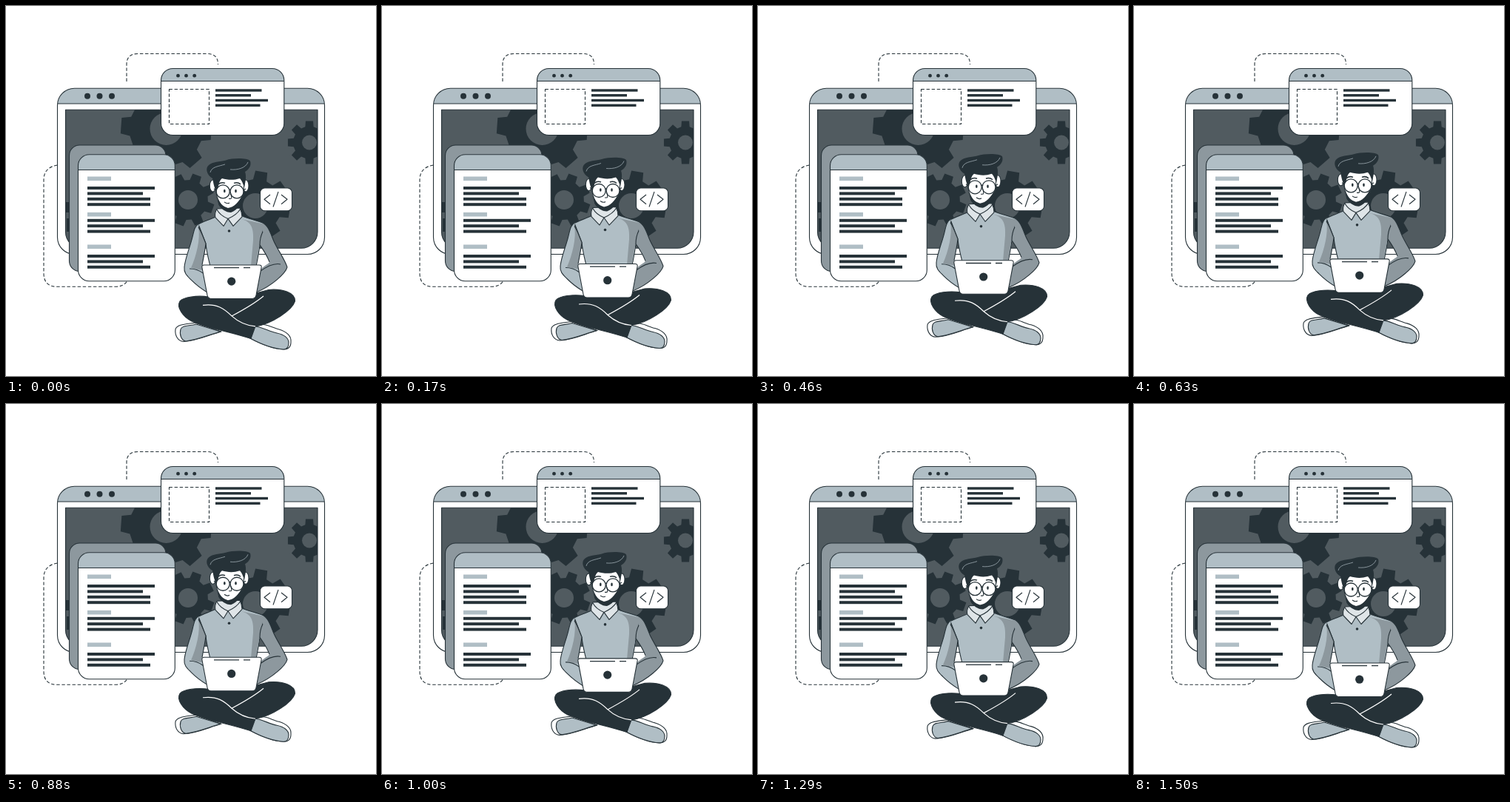
These frames come from a looping animation (500 by 500 pixels, 1540 ms). An HTML page with a canvas:

```html
<!DOCTYPE html>
<html lang="en">
<head>
<meta charset="utf-8">
<title>Developer at work</title>
<style>
html, body { margin: 0; width: 100%; height: 100%; overflow: hidden; background: #fff; }
canvas { display: block; width: 500px; height: 500px; }
</style>
</head>
<body>
<canvas id="stage"></canvas>
<script>
const LOOP = 1540, STEP = 1000 / 24, RISE = 8.5, LOW_POINT = -45;
const INK = '#263238', BLUE = '#b0bec5', SHADE = '#8d989e', SCREEN = '#515b60', WHITE = '#fff', COLLAR = '#dfe5e8';

const canvas = document.getElementById('stage');
const ctx = canvas.getContext('2d');
const ratio = window.devicePixelRatio || 1;
canvas.width = canvas.height = 500 * ratio;

function paint(path, fill, stroke, width = 1.1) {
  if (fill) { ctx.fillStyle = fill; ctx.fill(path); }
  if (stroke) { ctx.strokeStyle = stroke; ctx.lineWidth = width; ctx.stroke(path); }
}

function shape(d, fill, stroke, width) {
  paint(new Path2D(d), fill, stroke, width);
}

function line(d, width = 1.1, color = INK) {
  shape(d, null, color, width);
}

function oval(x, y, rx, ry, fill, stroke, width) {
  const p = new Path2D();
  p.ellipse(x, y, rx, ry, 0, 0, Math.PI * 2);
  paint(p, fill, stroke, width);
}

function dot(x, y, r, fill = INK) {
  oval(x, y, r, r, fill);
}

function box(x, y, right, bottom, radius, fill, stroke) {
  const p = new Path2D();
  p.roundRect(x, y, right - x, bottom - y, radius);
  paint(p, fill, stroke);
  return p;
}

function bar(x, y, right, height, fill = INK) {
  ctx.fillStyle = fill;
  ctx.fillRect(x, y - height / 2, right - x, height);
}

function dashed(d) {
  ctx.setLineDash([4.4, 2.7]);
  line(d);
  ctx.setLineDash([]);
}

function panel(x, y, right, bottom, radius, headerEnd) {
  const frame = box(x, y, right, bottom, radius, WHITE);
  ctx.save();
  ctx.clip(frame);
  ctx.fillStyle = BLUE;
  ctx.fillRect(x, y, right - x, headerEnd - y);
  ctx.restore();
  line(`M${x},${headerEnd}H${right}`);
  paint(frame, null, INK);
}

function gear(x, y, outer, inner, hole, degrees) {
  const p = new Path2D();
  const pitch = Math.PI / 4;
  const corners = [[-0.33, inner], [-0.22, outer], [0.22, outer], [0.33, inner]];
  for (let i = 0; i < 8; i++) {
    const mid = degrees * Math.PI / 180 + i * pitch;
    for (const [part, r] of corners) {
      const a = mid + part * pitch;
      p.lineTo(x + r * Math.cos(a), y + r * Math.sin(a));
    }
  }
  p.closePath();
  paint(p, INK);
  dot(x, y, hole, SCREEN);
}

function monitor() {
  panel(69.5, 111.2, 430.5, 335.5, 23, 132);
  [110, 126.5, 143].forEach(x => dot(x, 121.8, 4));
  const screen = box(80.5, 140.2, 421, 327.3, [0, 0, 22, 22], SCREEN);
  ctx.save();
  ctx.clip(screen);
  gear(216.5, 166, 62, 50, 22, 4);
  gear(246, 262, 36, 27, 13, -70);
  gear(337, 270, 47.5, 36, 17, 10);
  gear(410, 184.5, 29.5, 22, 10, 0);
  bar(80, 272, 86, 14);
  bar(82, 296, 86, 18);
  ctx.restore();
  paint(screen, null, INK);
}

function topWindow() {
  panel(209.5, 84.5, 375.8, 174.5, 16, 101.5);
  [232.5, 243.5, 254.7].forEach(x => dot(x, 94.2, 2.4));
  dashed('M220.5,112.5H274.5V159.5H220.5Z');
  [345.5, 331, 354, 343.5].forEach((right, i) => bar(283, 114 + i * 6.75, right, 3.4));
}

function documents() {
  box(85.5, 188, 216, 358.5, 14, SHADE, INK);
  panel(97.5, 200.7, 228.3, 371.7, 15, 221.5);
  const sections = [[233.3, 246, 4], [281.7, 289.8, 3], [325.3, 338, 3]];
  const ends = [201, 185, 195, 195];
  for (const [title, first, count] of sections) {
    bar(110, title, 142, 5.6, BLUE);
    for (let i = 0; i < count; i++) bar(110, first + i * 7.4, ends[i], 4);
  }
}

function codeBadge() {
  box(343.5, 246, 386.5, 276.7, 6, WHITE, INK);
  line('M357,255L349,261.3L357,267.7M368,251L361,271.5M372,255L380,261.3L372,267.7');
}

function torso() {
  shape('M283,285C275,289 267,291 260,295L270,321C271,333 274,343 276,352L280,388H334L338,352C340,342 342,332 343,323L349,294C338,289 327,288 318,283L300,288Z', BLUE, INK);
  shape('M318,288C331,291 335,300 334,317L331,351H337.5L342.5,323L348.5,294.5Z', SHADE);
}

function leftArm() {
  shape('M261,294C255,297 254,304 252,312C249,325 242,341 241,353C240,361 245,365 250,370Q260,380 272,387L275,370L265,356L265,350C267,340 269,330 270,321C267,314 264,305 260,299Z', BLUE);
  shape('M260,299C263,315 257,338 250,354L265,357V350C267,340 269,330 270,321Z', SHADE);
  line('M261,294C255,297 254,304 252,312C249,325 242,341 241,353C240,361 245,365 250,370Q260,380 272,387M260,299C264,305 267,314 270,321C269,330 267,340 265,350M248,355C256,355 261,357 266,361');
}

function rightArm() {
  shape('M347,293C355,297 358,309 362,318C368,331 377,343 380,353C378,361 360,378 338,387L343,358C347,351 355,349 356,346C353,338 348,330 343,323C343,316 345,309 347,305Z', SHADE);
  line('M347,293C355,297 358,309 362,318C368,331 377,343 380,353C378,361 360,378 338,387M347,305C345,309 343,316 343,323C348,330 353,338 356,346M343,359C351,353 361,347 371,349');
}

function collar() {
  shape('M285,274C282,279 282,282 283,286L294,297.5L300,287.5L307,297.5L319,285C319,281 318,277 316,273Z', COLLAR, INK);
  line('M285,275C288,281 294,285 300,287.5C308,284 314,279 317,274');
  dot(301.5, 304, 1.8);
}

function head() {
  oval(279.5, 243, 4.2, 8, WHITE, INK);
  oval(324, 243, 4, 8, WHITE, INK);
  shape('M283,232C283,249 285,262 289,269C294,275 299,278 304,277C312,273 318,265 320,257L323,231Z', WHITE, INK);
  shape('M286,257C288,266 293,271 300,273C308,272 315,265 320,254C320,266 313,276 304,279C297,279 290,274 287,268Z', INK);
  shape('M283,248C280,241 280,236 279,233C271,228 269,219 274,215C279,210 289,211 297,208.5C306,205.5 326,205 330,209.5C332,216 328,221 323,224C325,230 324,236 322,245C320,240 319,236 316,233C307,236 299,235 292,233C287,237 288,243 285,249Z', INK);
  line('M276,225C278,217 287,217 296,214M303,221C313,222 324,219 327,211', 0.7, BLUE);
  oval(293.2, 251, 9, 9, WHITE, INK, 1.3);
  oval(312, 251, 9, 9, WHITE, INK, 1.3);
  line('M302,249Q303,247.5 304,249M284,249L281,247M321,249L324,247', 1.2);
  line('M287,241Q291,237.5 296,239.5M308,239.5Q313,237.5 317,241', 1.5);
  oval(295.3, 250, 1.3, 2.3, INK);
  oval(310.5, 250, 1.3, 2.3, INK);
  line('M303,251C304,255 306,259 304,260.5L301,260.5M295,265Q299,268 302,266');
}

function legs() {
  shape('M256,428C244,430 231,430 229,437C228,445 232,453 240,453.5C257,453 273,445 291,440Z', WHITE, INK);
  shape('M257,430C247,433 238,431 236,437C234,444 237,452 243,453C260,451 275,444 290,440Z', BLUE, INK);
  shape('M339,431C351,428 359,435 369,437C379,440 386,446 385,454C385,461 381,464.5 375,464C358,463 343,456 330,449Z', WHITE, INK);
  shape('M336,433C345,433 355,440 366,442C376,444 382,449 382,455C382,461 379,464 375,464C358,463 343,456 330,449Z', BLUE, INK);
  shape('M274,393C258,391 240,393 235,399C230,407 239,420 251,426C271,435 302,440 331,449.5L337,433C359,430 387,411 390.5,399C391,387 373,382 355,383.5L338,388Z', INK, INK);
  line('M266,404.5C285,402 295,409 305,419C315,428 325,432 337,433M348,392C336,402 320,411 305,419', 1.2, WHITE);
}

function laptop() {
  shape('M268,350H342Q346,350 345,354L338,391Q337,395.5 333,395.5H277Q273,395.5 272,391L265,354Q264,350 268,350Z', WHITE, INK);
  line('M281,353.7H315M321,353.7H330', 1.3);
  dot(304.7, 372.2, 5.6);
}

function draw(time) {
  // The motion advances 24 times a second.
  const stepped = Math.floor((time % LOOP + 5) / STEP) * STEP;
  const lift = RISE * (1 - Math.cos(2 * Math.PI * (stepped - LOW_POINT) / LOOP)) / 2;

  ctx.setTransform(ratio, 0, 0, ratio, 0, 0);
  ctx.fillStyle = WHITE;
  ctx.fillRect(0, 0, 500, 500);
  ctx.lineJoin = 'round';
  dashed('M163,102V79Q163,64.5 178,64.5H272Q286.5,64.5 286.5,79');
  dashed('M69.5,215Q51,218 51,235V361Q51,379.3 69,379.3H148Q160,379 164,371');
  monitor();
  topWindow();
  documents();
  codeBadge();

  ctx.translate(0, -lift);
  torso();
  leftArm();
  rightArm();
  collar();
  head();
  legs();
  laptop();
}

const start = performance.now();
function tick() {
  draw(performance.now() - start);
  requestAnimationFrame(tick);
}
tick();
</script>
</body>
</html>
```
